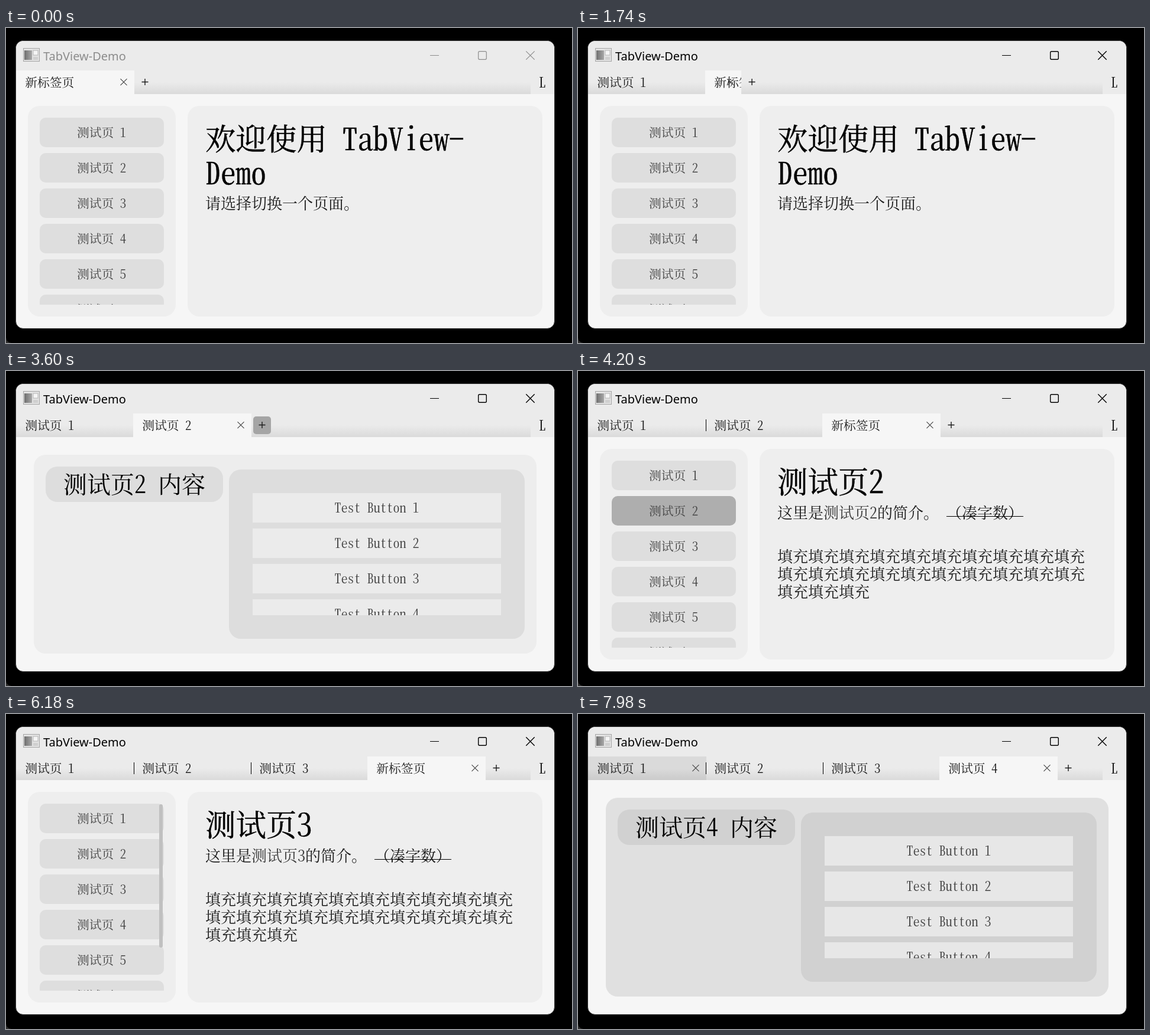
An HTML page that plays this animation: 957x534 px, repeating every 8 s.

```html
<!DOCTYPE html>
<html lang="zh-CN">
<head>
<meta charset="utf-8">
<title>TabView-Demo</title>
<style>
html, body { margin: 0; width: 100%; height: 100%; overflow: hidden; background: #000; }
svg { display: block; width: 957px; height: 534px; }
text {
  white-space: pre;
  font-family: "Noto Serif CJK SC", "Noto Sans CJK SC", "Noto Sans CJK", serif;
  font-weight: 300;
  font-feature-settings: "hwid" 1;
}
.full { font-feature-settings: normal; }
.caption { font: 400 20px "Noto Sans", "Open Sans", sans-serif; font-feature-settings: normal; }
</style>
</head>
<body>
<svg viewBox="0 0 957 534">
  <defs>
    <linearGradient id="shade" x1="0" y1="0" x2="0" y2="1">
      <stop offset=".5" stop-color="#ebebeb"/><stop offset="1" stop-color="#dadada"/>
    </linearGradient>
    <linearGradient id="pane"><stop offset="0" stop-color="#6f6f6f"/><stop offset="1" stop-color="#a8a8a8"/></linearGradient>
    <clipPath id="side"><rect x="57" y="152" width="210" height="317"/></clipPath>
    <clipPath id="list"><rect x="417" y="207" width="420" height="207"/></clipPath>
  </defs>
  <path d="M0 525Q1 533 9 534H0Z" fill="#2b2b2b"/>
  <rect x="16.5" y="21.5" width="911" height="488" rx="12.5" fill="#f6f6f6" stroke="#363636"/>
  <path d="M17 112V34A12 12 0 0 1 29 22H915A12 12 0 0 1 927 34V112Z" fill="#ebebeb"/>
  <rect x="17" y="72" width="870" height="40" fill="url(#shade)"/>
  <g>
    <rect x="29.5" y="34.5" width="27" height="22" fill="#e2e2e2" stroke="#a6a6a6"/>
    <rect x="31" y="38" width="13" height="16" fill="url(#pane)"/>
    <rect x="46" y="38" width="8" height="8" fill="#f5f5f5" stroke="#b5b5b5"/>
    <rect x="46" y="49" width="8" height="5" fill="#cfcfcf"/>
  </g>
  <g id="view"></g>
</svg>
<script>
const LOOP = 8000, STEP = 60, GROW = 360;
const TAB_PITCH = 198, TAB_WIDTH = 200;
const INK = '#1c1c1c', SOFT = '#444';
const view = document.getElementById('view');

// Panel, inner panel and button greys of each content page.
const PAGE_GREYS = [
  ['#e0e0e0', '#d1d1d1', '#e7e7e7'],
  ['#ededed', '#dddddd', '#ebebeb'],
  ['#f3f3f3', '#e2e2e2', '#eeeeee'],
  ['#e0e0e0', '#d1d1d1', '#e7e7e7']
];

const HOVER = 1, PRESS = 2;
const newTab = (tabs, opened) => ({ tabs, opened, page: 0, info: 0, row: 0, plus: 0 });
const point = row => ({ row, info: row, press: 0, bar: 0 });
const openPage = page => ({ page, row: 0, press: 0, bar: 0 });

const TIMELINE = [
  [0, { tabs: 1, opened: -LOOP, page: 0, info: 0, row: 0, press: 0, bar: 0, plus: 0, active: 0, close: 0, tabHover: 0 }],
  [300, { bar: 1 }],
  [360, point(1)],
  [720, { active: 1, press: 1 }],
  [840, openPage(1)],
  [1380, { plus: HOVER }],
  [1620, { plus: PRESS }],
  [1740, newTab(2, 1740)],
  [2100, { bar: 1 }],
  [2160, point(1)],
  [2340, point(2)],
  [2760, { press: 1 }],
  [2880, openPage(2)],
  [3360, { plus: HOVER }],
  [3600, { plus: PRESS }],
  [3720, newTab(3, 3720)],
  [4080, { bar: 1 }],
  [4140, point(1)],
  [4200, point(2)],
  [4500, point(3)],
  [4620, { press: 1 }],
  [4740, openPage(3)],
  [5340, { plus: HOVER }],
  [5520, { plus: PRESS }],
  [5640, newTab(4, 5640)],
  [6000, point(1)],
  [6060, point(2)],
  [6120, point(3)],
  [6180, { row: 0, bar: 1 }],
  [6240, point(4)],
  [6660, { press: 1 }],
  [6780, openPage(4)],
  [7680, { tabHover: 1 }],
  [7740, { close: HOVER }],
  [7860, { close: PRESS }],
  [7980, { close: 0 }]
];

const rect = (x, y, w, h, fill, r = 0) =>
  `<rect x="${x}" y="${y}" width="${w}" height="${h}" rx="${r}" fill="${fill}"/>`;
const path = (d, color, width) =>
  `<path d="${d}" fill="none" stroke="${color}" stroke-width="${width}"/>`;
const label = (str, x, y, size, fill = INK, extra = '') =>
  `<text x="${x}" y="${y}" font-size="${size}" fill="${fill}" ${extra}>${str}</text>`;
const centered = (str, x, y, size, fill) => label(str, x, y, size, fill, 'text-anchor="middle"');
const heading = (str, y) => label(str, 337, y, 51.5, '#000', 'stroke="#000" stroke-width=".4"');
const cross = (x, y, r, color, width) =>
  path(`M${x - r} ${y - r}l${2 * r} ${2 * r}m0 ${-2 * r}l${-2 * r} ${2 * r}`, color, width);

function caption(active) {
  const color = active ? '#000' : '#8c8c8c', width = active ? 1.4 : 1.2;
  return `<text class="caption" x="63" y="55" fill="${color}">TabView-Demo</text>` +
    path('M717 46.5h15', color, 1) +
    `<rect x="798.7" y="39.7" width="13.6" height="13.6" rx="2" fill="none" stroke="${color}" stroke-width="${width}"/>` +
    cross(886.5, 46.5, 7.2, color, width);
}

function tabStrip(s, t) {
  const grown = Math.min(1, (t - s.opened + STEP) / GROW);
  const width = TAB_WIDTH * (1 - (1 - grown) ** 2);
  const last = s.tabs - 1, x0 = 17 + TAB_PITCH * last, end = x0 + width;
  let out = '';
  if (s.tabHover) {
    out += '<rect x="17" y="72" width="200" height="40" fill="#000" opacity=".07"/>';
    if (s.close) out += rect(187, 80, 24, 24, s.close === PRESS ? '#a5a5a5' : '#bcbcbc', 4);
    out += cross(199, 91.7, 5.5, SOFT, 1.1);
  }
  for (let i = 0; i < last; i++) {
    out += label(`测试页 ${i + 1}`, 32.2 + TAB_PITCH * i, 100, 20.8);
    if (i) out += rect(18 + TAB_PITCH * i, 82, 1, 20, '#000');
  }
  out += rect(x0, 72, width, 40, '#f6f6f6');
  out += `<svg x="${x0}" y="72" width="${width}" height="40">` +
    label(s.page ? `测试页 ${s.page}` : '新标签页', 15.2, 28, 20.8) +
    cross(width - 18, 19.7, 5.5, SOFT, 1.1) + '</svg>';
  if (s.plus) out += rect(end + 3, 77, 30, 30, s.plus === PRESS ? '#a5a5a5' : '#c4c4c4', 5);
  return out + path(`M${end + 12.5} 91.5h11m-5.5 -5.5v11`, INK, 1.4) + centered('L', 906.8, 101, 24, INK);
}

function details(n) {
  if (!n) {
    return heading('欢迎使用 TabView-', 207) + heading('Demo', 265) +
      label('请选择切换一个页面。', 337, 307.3, 26);
  }
  const intro = `这里是<tspan fill="#3c3c3c">测试页${n}</tspan>的简介。`;
  return heading(`测试页${n}`, 207) + label(intro, 337, 249.5, 26) +
    label('（凑字数）', 623, 249.5, 26, INK, 'class="full"') + rect(623, 246, 130, 1, '#000') +
    [10, 10, 3].map((count, i) => label('填充'.repeat(count), 337, 323.5 + 30 * i, 26)).join('');
}

function homePage(s) {
  let rows = '';
  for (let i = 0; i < 6; i++) {
    const y = 152 + 60 * i;
    const fill = s.row !== i + 1 ? '#dedede' : s.press ? '#929292' : '#aeaeae';
    rows += rect(57, y, 210, 50, fill, 10) + centered(`测试页 ${i + 1}`, 161.6, y + 33, 20.8, SOFT);
  }
  if (s.bar) rows += rect(259, 153, 6, 243, '#c0c0c0', 3);
  return rect(37, 132, 250, 357, '#eee', 20) + rect(307, 132, 600, 357, '#eee', 20) +
    `<g clip-path="url(#side)">${rows}</g>` + details(s.info);
}

function contentPage(n) {
  const [panel, inner, button] = PAGE_GREYS[n - 1];
  let rows = '';
  for (let i = 0; i < 4; i++) {
    const y = 207 + 60 * i;
    rows += rect(417, y, 420, 50, button) + centered(`Test Button ${i + 1}`, 627, y + 32.5, 22, SOFT);
  }
  return rect(47, 142, 850, 337, panel, 20) + rect(67, 162, 300, 60, inner, 20) +
    rect(377, 167, 500, 287, inner, 20) + label(`测试页${n} 内容`, 97, 207, 40, '#000') +
    `<g clip-path="url(#list)">${rows}</g>`;
}

let shown = '';
function draw() {
  const now = performance.now() % LOOP, t = Math.floor(now / STEP) * STEP;
  const s = Object.assign({}, ...TIMELINE.filter(([at]) => at <= now).map(([, change]) => change));
  const markup = caption(s.active) + tabStrip(s, t) + (s.page ? contentPage(s.page) : homePage(s));
  if (markup !== shown) view.innerHTML = shown = markup;
  requestAnimationFrame(draw);
}
draw();
</script>
</body>
</html>
```
